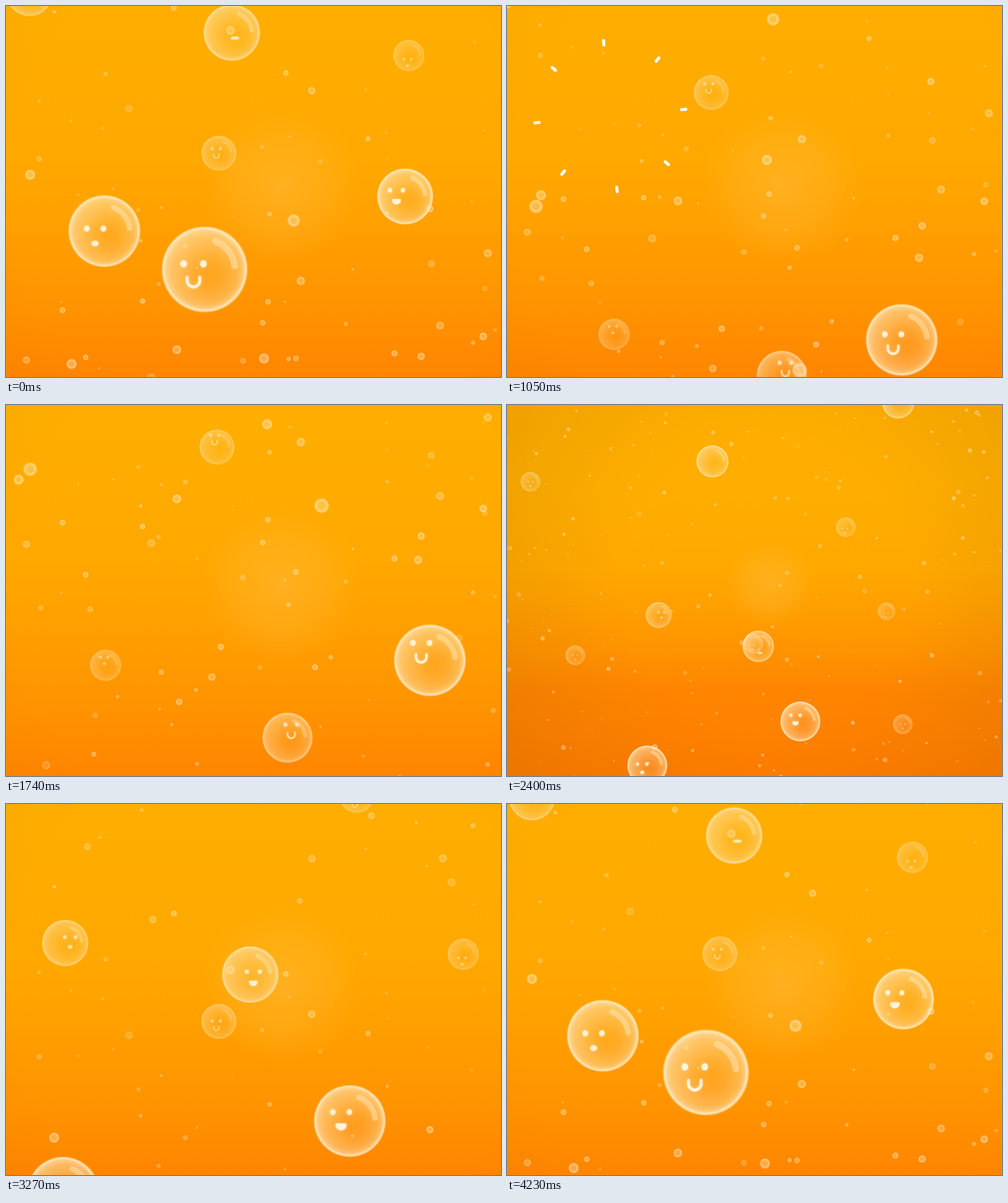
Write an HTML page with a canvas that moves like this. It is 800 px wide and 600 px high and loops after 4290 ms.

```html
<!DOCTYPE html>
<html lang="en">
<head>
<meta charset="utf-8">
<title>Fizzy bubbles</title>
<style>
html, body { margin: 0; width: 100%; height: 100%; overflow: hidden; background: #ffa800; }
canvas { display: block; }
</style>
</head>
<body>
<canvas id="stage" width="800" height="600"></canvas>
<script>
const ctx = document.getElementById('stage').getContext('2d');
const LOOP = 4290, CUT = 2130, TAU = Math.PI * 2;
const CX = 400, CY = 285;   // camera centre

// Time is counted from the loop point: the wide shot and zoom lie before 0, the rest after.
// path: a few points [time, x, y]; face: offset from the centre and how far it shifts along the path
const bubbles = [
  { r: 28, mouth: 'u', face: [-4, 5, -24], path: [[-1875, 396, 466], [-1462, 344, 402], [0, 344, 238], [1050, 330, 140], [1762, 341, 68]] },
  { r: 28, mouth: 'u', face: [-3, 4, 0], path: [[-1875, 665, 128], [-1462, 618, 60]] },
  { r: 28, mouth: 'o', face: [-3, -5, 0], path: [[-1875, 830, 700]] },
  { r: 28, mouth: 'o', face: [-3, 2, 0], path: [[-1875, -120, 500]] },
  { r: 28, mouth: 'o', face: [3, 4, 0], path: [[-1875, -250, -4]] },
  { r: 25, mouth: 'o', face: [-2, 6, 0], path: [[-1875, 783, 372], [-600, 718, 181], [0, 651, 80]] },
  { r: 25, mouth: 'o', face: [-2, -13, 0], path: [[1050, 173, 531], [1762, 161, 421]] },
  { r: 37, mouth: 'o', face: [8, -8, -3], path: [[-1875, 122, 383], [-1462, 116, 315], [-600, 77, 142], [0, 38, -21]] },
  { r: 40, mouth: 'u', face: [6, -21, 0], path: [[-1875, 494, 900], [1050, 444, 598], [1762, 455, 538]] },
  { r: 46, path: [[-1875, 278, -63]] },
  { r: 46, path: [[-1875, 817, -234]] },
  { r: 45, sings: true, face: [5, 0, -10], path: [[-1875, 411, 474], [-1462, 389, 389], [-600, 400, 172], [0, 365, 43]] },
  { r: 57, mouth: 'd', face: [-14, -18, 8], pop: 60, path: [[-1875, 533, 692], [-1462, 530, 606], [-600, 579, 427], [0, 645, 308]] },
  { r: 57, mouth: 'o', face: [-15, -4, 0], pop: 800, path: [[-1875, 89, 820], [-600, 94, 537], [0, 159, 364], [800, 167, 178]] },
  { r: 57, mouth: 'u', face: [-14, -9, -19], path: [[1050, 638, 540], [1762, 685, 413]] },
  { r: 68, mouth: 'u', face: [-18, -9, 0], pop: 520, path: [[-1875, 380, 960], [-600, 329, 556], [0, 321, 426], [520, 310, 300]] },
  { r: 13, path: [[1050, 473, 589], [1762, 510, 163]] },
  { r: 12, path: [[1050, 47, 324], [1762, 39, 104]] },
  { r: 11, path: [[-600, 485, 533], [0, 465, 347]] },
  { r: 9, path: [[-600, 62, 431], [0, 39, 273]] },
  { r: 9, path: [[0, 106, 579], [1050, 55, 306]] },
  { r: 9, path: [[0, 417, 570], [1050, 420, 249]] }
];

let seed = 7;
function random() {
  seed = (seed * 16807) % 2147483647;
  return seed / 2147483647;
}
// Bigger specks are nearer, so they rise faster
const specks = Array.from({ length: 270 }, () => {
  const r = 2 + 6 * random() ** 2.2;
  return { r, x: 1600 * random() - 400, y: 1300 * random(), speed: .055 + .022 * r, alpha: .4 + .45 * random() };
});

const clamp = v => Math.max(0, Math.min(1, v));
const cream = a => `rgba(255,236,200,${a})`;

function radial(x, y, r0, r1, stops) {
  const g = ctx.createRadialGradient(x, y, r0, x, y, r1);
  stops.forEach(([p, c]) => g.addColorStop(p, c));
  return g;
}
function oval(x, y, rx, ry) {
  ctx.beginPath();
  ctx.ellipse(x, y, rx, ry, 0, 0, TAU);
  ctx.fill();
}

// Linear between points, carried on past both ends
function position(path, t) {
  if (path.length === 1) return { x: path[0][1], y: path[0][2] - .2 * (t - path[0][0]) };
  let i = 1;
  while (i < path.length - 1 && t > path[i][0]) i++;
  const [t0, x0, y0] = path[i - 1], [t1, x1, y1] = path[i];
  const p = (t - t0) / (t1 - t0);
  return { x: x0 + (x1 - x0) * p, y: y0 + (y1 - y0) * p };
}

function drawBackground() {
  const g = ctx.createLinearGradient(0, -300, 0, 900);
  [[0, '#ffae00'], [.25, '#ffae00'], [.46, '#ffa800'], [.54, '#ffa000'], [.65, '#ff9400'], [.75, '#ff8500'], [1, '#ff7c00']]
    .forEach(([p, c]) => g.addColorStop(p, c));
  const fill = style => { ctx.fillStyle = style; ctx.fillRect(-450, -350, 1700, 1300); };
  fill(g);
  fill(radial(445, 290, 0, 130, [[0, 'rgba(255,190,70,.45)'], [.6, 'rgba(255,186,55,.28)'], [1, 'rgba(255,180,40,0)']]));
  fill(radial(435, 290, 420, 900, [[0, 'rgba(90,50,0,0)'], [1, 'rgba(90,50,0,.1)']]));
}

function drawRing(x, y, r, alpha) {
  ctx.globalAlpha = alpha;
  ctx.fillStyle = radial(x, y, 0, r, [[0, cream(.4)], [.45, cream(.45)], [.72, cream(.8)], [1, cream(0)]]);
  oval(x, y, r, r);
}

function drawSpeck(s, t) {
  const y = (s.y - s.speed * t + 2600) % 1300 - 320;
  drawRing(s.x, y, s.r, s.alpha);
}

function drawFace(r, mouth, fx, fy, open) {
  ctx.save();
  ctx.translate(fx, fy);
  ctx.fillStyle = ctx.strokeStyle = 'rgba(255,246,228,.92)';
  ctx.shadowColor = cream(.6);
  ctx.shadowBlur = r * .08;
  if (open > .05) for (const side of [-1, 1]) oval(side * r * .235, 0, r * .08, r * .085 * open);
  const my = r * .42;
  ctx.beginPath();
  if (mouth === 'u') {
    ctx.lineWidth = r * .07;
    ctx.moveTo(-r * .15, my - r * .1);
    ctx.arc(0, my - r * .02, r * .15, Math.PI, 0, true);
    ctx.lineTo(r * .15, my - r * .1);
    ctx.stroke();
  } else if (mouth === 'd') {
    ctx.lineJoin = 'round';
    ctx.lineWidth = r * .08;
    ctx.arc(0, my - r * .06, r * .12, 0, Math.PI);
    ctx.closePath();
    ctx.fill();
    ctx.stroke();
  } else if (mouth === '-') {
    oval(0, my, r * .16, r * .06);
  } else {
    oval(0, my, r * .1, r * .08);
  }
  ctx.restore();
}

function drawBubble(b, t) {
  const { x, y } = position(b.path, t);
  if (b.r < 20) return drawRing(x, y, b.r, .8);
  // Small bubbles are far off and faint; a bubble shrinks just before it pops
  const alpha = clamp(b.r / 60);
  const r = b.r * (b.pop ? 1 - .33 * clamp((t - b.pop + 180) / 180) : 1);
  ctx.save();
  ctx.translate(x, y);

  ctx.globalAlpha = .2 + .8 * alpha;
  ctx.fillStyle = radial(r * .14, r * .12, 0, r * 1.15,
    [[0, cream(.14)], [.3, cream(.22)], [.65, cream(.42)], [1, cream(.62)]]);
  oval(0, 0, r, r);

  ctx.globalAlpha = alpha ** 1.7;
  ctx.fillStyle = radial(0, 0, r * .8, r * 1.04, [[0, cream(0)], [.45, cream(.2)], [.75, cream(.85)], [1, cream(0)]]);
  oval(0, 0, r * 1.04, r * 1.04);

  ctx.globalAlpha = alpha;
  ctx.lineCap = 'round';
  ctx.lineWidth = r * .16;
  ctx.strokeStyle = cream(.45);
  ctx.beginPath();
  ctx.arc(0, 0, r * .72, -1.2, -.12);
  ctx.stroke();

  if (b.face) {
    const [fx, fy, shift] = b.face, begin = b.path[0][0], end = b.path.at(-1)[0];
    const open = b.sings ? clamp(Math.sin(Math.PI * (t + 1560) / 1500)) : 1;
    const mouth = b.mouth || (open > .5 ? 'd' : '-');
    drawFace(r, mouth, fx, fy + shift * clamp((t - begin) / (end - begin)), open);
  }
  ctx.restore();
}

function drawBurst(b, t) {
  const p = (t - b.pop) / 300;
  if (p < 0 || p >= 1) return;
  const { x, y } = position(b.path, b.pop);
  const dist = b.r * (.6 + 1.53 * (1 - (1 - p) ** 2));
  ctx.save();
  ctx.translate(x, y);
  ctx.rotate(-.09);
  ctx.strokeStyle = '#fff';
  ctx.lineWidth = 5;
  ctx.lineCap = 'round';
  for (let i = 0; i < 8; i++) {
    ctx.rotate(TAU / 8);
    ctx.beginPath();
    ctx.moveTo(dist - 3.5, 0);
    ctx.lineTo(dist + 3.5, 0);
    ctx.stroke();
  }
  ctx.restore();
}

// Wide shot after the cut, then an eased push in
function zoom(ms) {
  if (ms < CUT) return 1;
  const p = clamp((ms - 2250) / 540);
  return .5 + .5 * (p < .5 ? 4 * p ** 3 : 1 - (2 - 2 * p) ** 3 / 2);
}

// Four even steps fill five 30 ms ticks; the last one is held
function stepTime(ms) {
  const offset = ms < CUT ? 0 : 3, tick = Math.floor(ms / 30) - offset;
  return offset * 30 + Math.floor(tick / 5) * 150 + Math.min(tick % 5, 3) * 37.5;
}

function render(now) {
  const clock = now % LOOP, ms = stepTime(clock);
  const t = clock < CUT ? ms : ms - LOOP;
  const s = zoom(clock < CUT ? 0 : ms);
  ctx.setTransform(s, 0, 0, s, CX * (1 - s), CY * (1 - s));
  ctx.globalAlpha = 1;
  drawBackground();
  for (const b of bubbles) if (!b.pop || t < b.pop) drawBubble(b, t);
  for (const speck of specks) drawSpeck(speck, t);
  ctx.globalAlpha = 1;
  for (const b of bubbles) if (b.pop) drawBurst(b, t);
}

let start;
function loop(now) {
  start ??= now;
  render(now - start);
  requestAnimationFrame(loop);
}
render(0);
requestAnimationFrame(loop);
</script>
</body>
</html>
```
